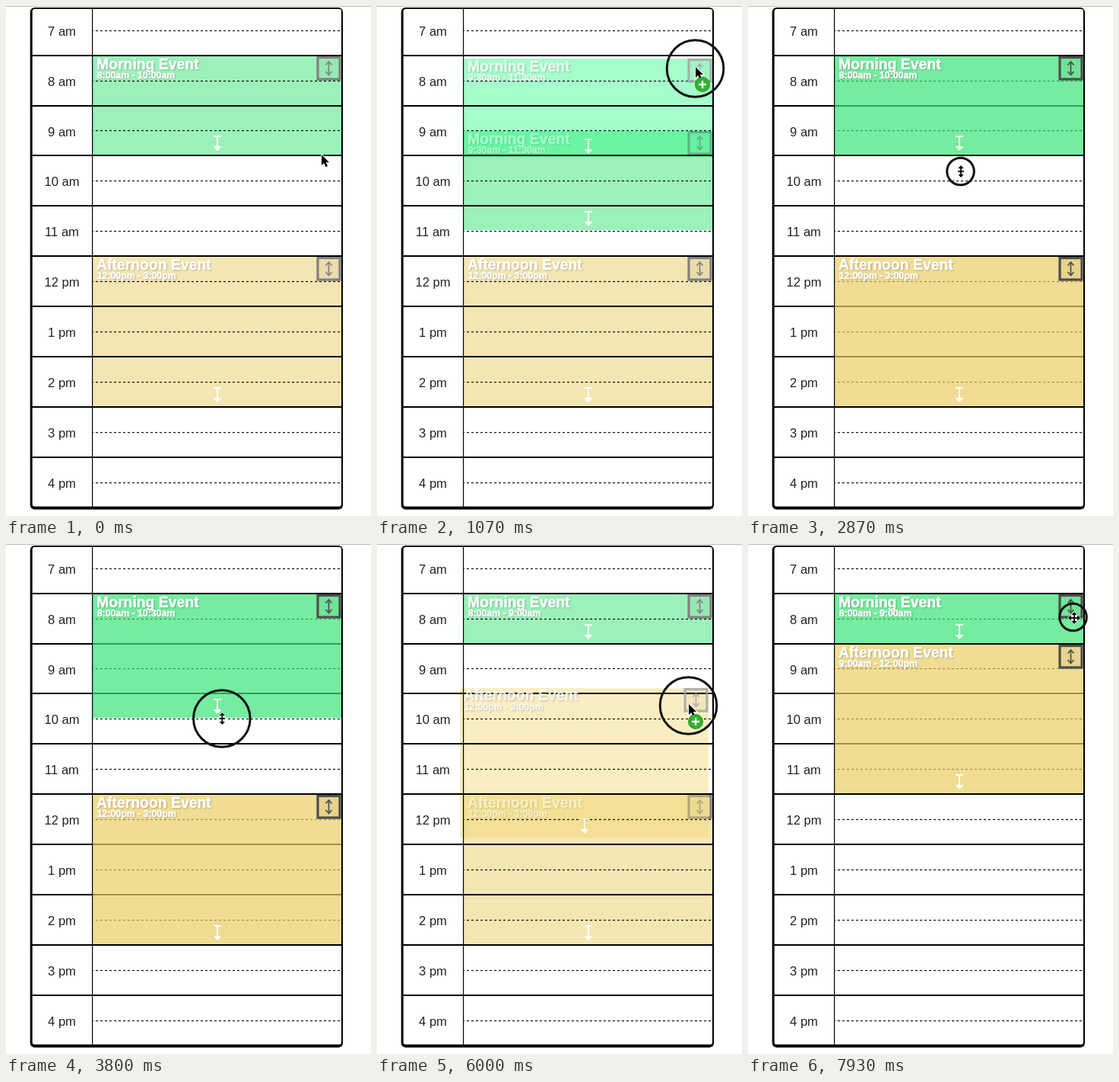
Recreate the animation shown at these times as an HTML page with a canvas. Size 480 by 669 pixels, loop 8 s.

```html
<!DOCTYPE html>
<html lang="en">
<head>
<meta charset="utf-8">
<title>Day planner</title>
<style>
  html, body { margin: 0; width: 100%; height: 100%; overflow: hidden; background: #fff; }
  canvas { display: block; }
</style>
</head>
<body>
<canvas id="stage" width="480" height="669"></canvas>
<script>
const ctx = document.getElementById('stage').getContext('2d');
const LOOP = 8000;
const FONT = '"Liberation Sans", Helvetica, Arial, sans-serif';
const LEFT = 114, RIGHT = 441, HOUR = 65.88;
const GREEN = { base: [59, 228, 119], ghost: [40, 250, 132] };
const YELLOW = { base: [234, 206, 102], ghost: [240, 215, 108] };

// Pointer stops: time, x, y
const PATH = [
  [0, 415, 195], [150, 415, 195], [550, 419, 175], [850, 419, 175],
  [1070, 419, 80], [1300, 420, 83], [2000, 420, 84], [2600, 280, 188],
  [2790, 280, 188], [2870, 280, 217], [3350, 283, 265], [3550, 283, 265],
  [4300, 288, 127], [4700, 288, 127], [5150, 415, 350], [5450, 415, 350],
  [6000, 410, 210], [6800, 404, 159], [7300, 404, 159], [7780, 428, 96], [LOOP, 428, 96]
];
const PRESSES = [[840, 1650], [2790, 4450], [5420, 6850], [7850, LOOP]];
const FADES = [[0, 220], [880, 1950], [5480, 7300]];
const DRAGS = [
  { from: 880, to: 1650, item: 0, x: 419, y: 175 },
  { from: 5480, to: 6850, item: 1, x: 415, y: 350 }
];
const RESIZE = { from: 2790, to: 4450, y: 188 };

const within = (t, [from, to]) => t >= from && t < to;
const yOf = hour => Math.floor(65.12 + (hour - 8) * HOUR);

function pointerAt(t) {
  const i = Math.max(1, PATH.findIndex(stop => stop[0] > t));
  const [t0, x0, y0] = PATH[i - 1], [t1, x1, y1] = PATH[i];
  const u = (t - t0) / (t1 - t0), k = u * u * (3 - 2 * u);
  return { x: x0 + (x1 - x0) * k, y: y0 + (y1 - y0) * k };
}

function eventsAt(t, pointer) {
  let start = 8, end = 10;
  if (within(t, [220, 1950])) {
    start = 9.5; end = 11.5;
  } else if (t >= RESIZE.to) {
    end = 9;
  } else if (t >= RESIZE.from) {
    end = 10 + Math.floor((pointer.y - RESIZE.y) / (HOUR / 2)) / 2;
  }
  const noon = t < 7300 ? 12 : 9;
  return [
    { title: 'Morning Event', start, end, color: GREEN },
    { title: 'Afternoon Event', start: noon, end: noon + 3, color: YELLOW }
  ];
}

function clock(hour) {
  const h = Math.floor(hour);
  return `${(h + 11) % 12 + 1}:${hour % 1 ? '30' : '00'}${h < 12 ? 'am' : 'pm'}`;
}

function line(points, color, width) {
  ctx.beginPath();
  points.forEach(([x, y], i) => i ? ctx.lineTo(x, y) : ctx.moveTo(x, y));
  ctx.strokeStyle = color;
  ctx.lineWidth = width;
  ctx.stroke();
}

function polygon(points, color) {
  ctx.beginPath();
  points.forEach(([x, y]) => ctx.lineTo(x, y));
  ctx.closePath();
  ctx.fillStyle = color;
  ctx.fill();
}

function disc(x, y, r, color) {
  ctx.beginPath();
  ctx.arc(x, y, r, 0, 2 * Math.PI);
  ctx.fillStyle = color;
  ctx.fill();
}

function drawLines() {
  ctx.fillStyle = '#000';
  for (let hour = 8; hour <= 17; hour++) ctx.fillRect(34, yOf(hour) - 1, 408, 2);
  ctx.setLineDash([3, 3]);
  ctx.lineDashOffset = 2;
  for (let hour = 7; hour < 17; hour++) {
    const y = yOf(hour + 0.5) + 0.5;
    line([[LEFT, y], [RIGHT, y]], '#000', 1.2);
  }
  ctx.setLineDash([]);
}

function drawFrame() {
  ctx.fillStyle = '#bbb';
  ctx.fillRect(0, 0, 480, 1);
  ctx.fillStyle = '#000';
  ctx.beginPath();
  ctx.roundRect(31.7, 2, 411.3, 658.5, 6);
  ctx.roundRect(34.7, 4, 406.3, 652.5, 3);
  ctx.fill('evenodd');
  ctx.fillRect(113, 4, 1.2, 653);
  ctx.font = `16.6px ${FONT}`;
  ctx.textAlign = 'center';
  ctx.fillStyle = '#222';
  for (let hour = 7; hour < 17; hour++) {
    ctx.fillText(`${(hour + 11) % 12 + 1} ${hour < 12 ? 'am' : 'pm'}`, 73.5, yOf(hour) + 40);
  }
}

function drawButton(y, gray) {
  ctx.fillStyle = 'rgba(0,0,0,.04)';
  ctx.fillRect(409, y + 1, 31, 32);
  ctx.strokeStyle = gray;
  ctx.lineWidth = 3.2;
  ctx.strokeRect(410, y + 2.5, 29, 28.5);
  line([[424.5, y + 8.5], [424.5, y + 25]], gray, 1.7);
  line([[420.5, y + 12.5], [424.5, y + 8], [428.5, y + 12.5]], gray, 1.7);
  line([[420.5, y + 21], [424.5, y + 25.5], [428.5, y + 21]], gray, 1.7);
}

function drawText(text, size, x, y) {
  ctx.save();
  ctx.font = `bold ${size}px ${FONT}`;
  ctx.textAlign = 'left';
  ctx.fillStyle = ctx.strokeStyle = '#fff';
  ctx.lineWidth = 0.5;
  ctx.shadowColor = 'rgba(0,0,0,.3)';
  ctx.shadowBlur = 2;
  ctx.shadowOffsetX = ctx.shadowOffsetY = 1;
  ctx.fillText(text, x, y);
  ctx.shadowColor = 'transparent';
  ctx.strokeText(text, x, y);
  ctx.restore();
}

function drawContent(event, gray) {
  const top = yOf(event.start), bottom = yOf(event.end);
  drawButton(top, gray);
  drawText(event.title, 19.4, 119, top + 17.5);
  drawText(`${clock(event.start)} - ${clock(event.end)}`, 12.3, 119.7, top + 30);
  line([[273, bottom - 25], [283, bottom - 25]], '#fff', 2);
  line([[278, bottom - 25], [278, bottom - 9]], '#fff', 2);
  polygon([[272.5, bottom - 12], [283.5, bottom - 12], [278, bottom - 6]], '#fff');
}

function fillEvent(event, color, alpha) {
  const top = yOf(event.start);
  ctx.fillStyle = `rgba(${color},${alpha})`;
  ctx.fillRect(LEFT, top + 1, RIGHT - LEFT, yOf(event.end) - top - 2);
}

function drawEvent(event, alpha) {
  fillEvent(event, event.color.base, alpha);
  const level = 255 * (1 - alpha);
  drawContent(event, `rgb(${level},${level},${level})`);
}

function drawArrow(x, y) {
  ctx.save();
  ctx.translate(x, y);
  const shape = [[0, 0], [0, 14], [3.2, 11], [5.4, 16.2], [8, 15], [5.8, 10], [10, 10]];
  line([...shape, shape[0]], '#fff', 2);
  polygon(shape, '#000');
  ctx.restore();
}

// Pointer made of arrowheads around a centre, one for each angle
function drawHeads(x, y, angles, reach, bar) {
  for (const [color, grow] of [['#fff', 1.2], ['#000', 0]]) {
    ctx.save();
    ctx.translate(x, y);
    if (bar) line([[-4 - grow, 0], [4 + grow, 0]], color, 1.6 + 2 * grow);
    for (const angle of angles) {
      ctx.save();
      ctx.rotate(angle);
      line([[0, 0], [0, -reach + 3]], color, 1.8 + 2 * grow);
      polygon([[-3.5 - grow, -reach + 4 + grow], [0, -reach - grow], [3.5 + grow, -reach + 4 + grow]], color);
      ctx.restore();
    }
    ctx.restore();
  }
}

function drawPointer(t, { x, y }, events, faded, dragging) {
  const press = PRESSES.find(span => within(t, span));
  if (press) {
    ctx.beginPath();
    ctx.arc(x - 0.5, y + (dragging ? 2 : 0), 37.3 * Math.min(1, (t - press[0]) / 170), 0, 2 * Math.PI);
    ctx.strokeStyle = '#111';
    ctx.lineWidth = 3;
    ctx.stroke();
  }
  const inColumn = x > LEFT && x < RIGHT;
  const overButton = events.some(e => x > 408 && inColumn && y > yOf(e.start) && y < yOf(e.start) + 33);
  const overGrip = events.some(e => inColumn && y > yOf(e.end) - 15 && y < yOf(e.end));
  const resizing = within(t, [RESIZE.from, RESIZE.to]);
  if (!faded && (resizing || overGrip)) {
    drawHeads(x, y, [0, Math.PI], 8, true);
  } else if (!faded && overButton) {
    drawHeads(x + 1, y + 1, [0, 1, 2, 3].map(n => n * Math.PI / 2), 8, false);
  } else {
    drawArrow(x, y);
  }
  if (dragging) {
    disc(x + 9, y + 23, 10, '#239a24');
    disc(x + 9, y + 23, 8.8, '#35b033');
    line([[x + 4, y + 23], [x + 14, y + 23]], '#fff', 2.4);
    line([[x + 9, y + 18], [x + 9, y + 28]], '#fff', 2.4);
  }
}

function render(t) {
  const pointer = pointerAt(t);
  const events = eventsAt(t, pointer);
  const faded = FADES.some(span => within(t, span));
  const drag = DRAGS.find(d => within(t, [d.from, d.to]));
  const drawGhostPart = draw => {
    if (!drag) return;
    ctx.save();
    ctx.translate(pointer.x - drag.x, pointer.y - drag.y);
    draw(events[drag.item]);
    ctx.restore();
  };

  ctx.fillStyle = '#fff';
  ctx.fillRect(0, 0, 480, 669);
  if (!faded) drawLines();
  events.forEach(event => drawEvent(event, faded ? 0.5 : 0.7));
  drawGhostPart(event => fillEvent(event, event.color.ghost, 0.42));
  if (faded) drawLines();
  drawFrame();
  drawGhostPart(event => {
    ctx.globalAlpha = 0.8;
    drawContent(event, '#a2a2a2');
  });
  drawPointer(t, pointer, events, faded, Boolean(drag));
}

const begin = performance.now();
function tick() {
  render((performance.now() - begin) % LOOP);
  requestAnimationFrame(tick);
}
tick();
</script>
</body>
</html>
```
